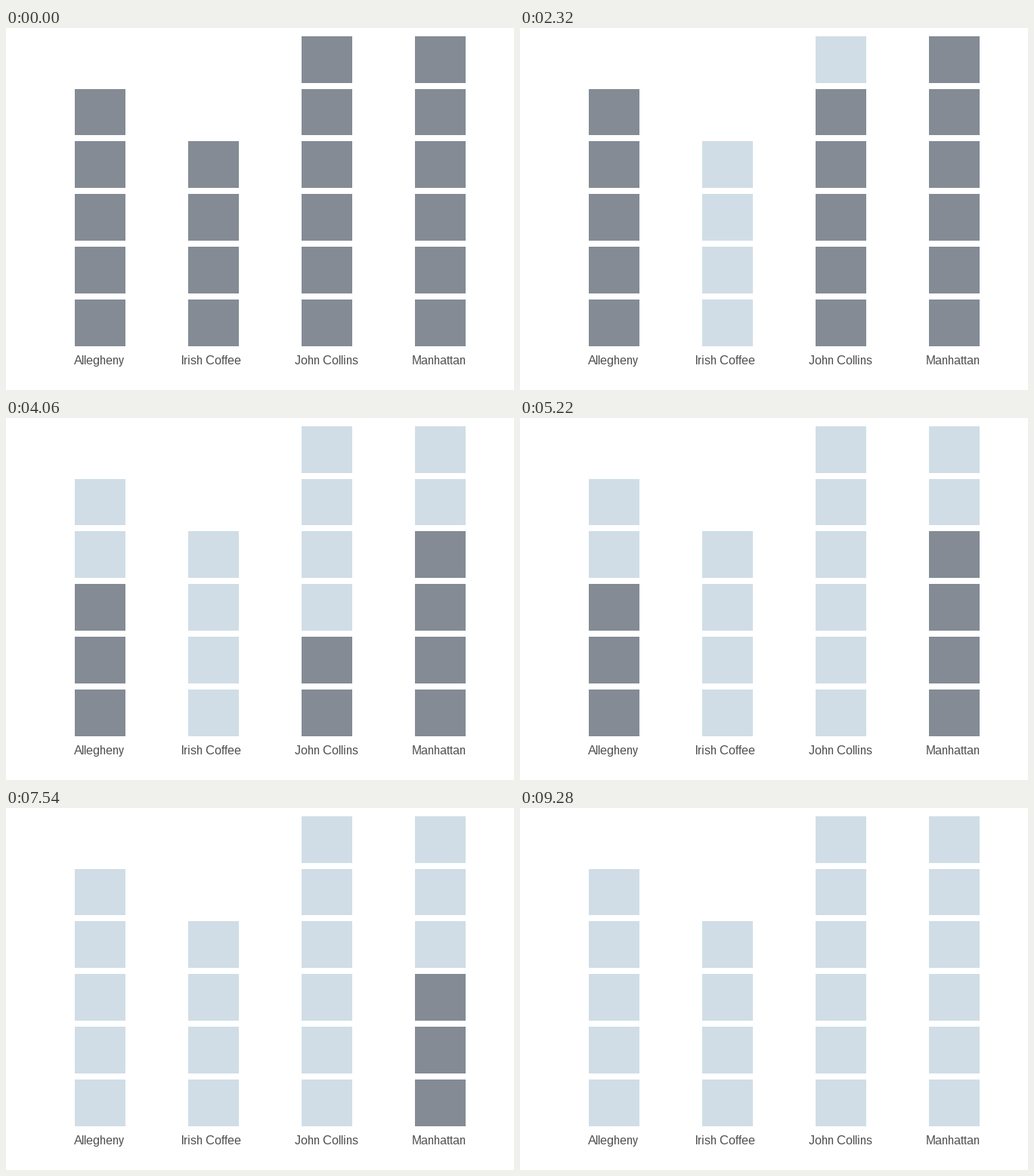
Write a matplotlib script that moves like this. It is 672 by 480 pixels and loops after 9.86 s.

```python
import matplotlib.pyplot as plt
from matplotlib.animation import FuncAnimation
from matplotlib.patches import Rectangle

# Full glyph hinting keeps the labels crisp on the pixel grid
plt.rcParams.update({
    "font.family": "Liberation Sans",
    "text.hinting": "native",
    "text.hinting_factor": 1,
})

WIDTH, HEIGHT, DPI = 672, 480, 96
STEPS, STEP_MS = 17, 580
FULL, EMPTY, INK = "#848b95", "#d0dde6", "#4d4d4d"
ROWS, PITCH = 6, 69.8
BASELINE = 446

# label, label x, column x, step at which each block fades (top to bottom)
COLUMNS = [
    ("Allegheny", 90, 91, (5, 6, 10, 11, 12)),
    ("Irish Coffee", 232, 241, (1, 2, 3, 4)),
    ("John Collins", 382, 391, (1, 5, 6, 7, 8, 9)),
    ("Manhattan", 537, 541, (5, 7, 13, 14, 15, 16)),
]

fig = plt.figure(figsize=(WIDTH / DPI, HEIGHT / DPI), dpi=DPI, facecolor="white")
ax = fig.add_axes([0, 0, 1, 1])
ax.set(xlim=(0, WIDTH), ylim=(HEIGHT, 0))
ax.axis("off")


def add_block(x, row):
    top = round(10.8 + PITCH * row)
    bottom = round(72.6 + PITCH * row)
    block = Rectangle((x, top), 67, bottom - top, facecolor=FULL,
                      linewidth=0, antialiased=False)
    return ax.add_patch(block)


blocks = []
for label, label_x, x, fades in COLUMNS:
    first_row = ROWS - len(fades)
    for row, fade in enumerate(fades, first_row):
        blocks.append((add_block(x, row), fade))
    ax.text(label_x, BASELINE, label, size=12, color=INK,
            ha="left", va="baseline")


def draw(step):
    for block, fade in blocks:
        block.set_facecolor(EMPTY if step >= fade else FULL)
    return [block for block, _ in blocks]


anim = FuncAnimation(fig, draw, frames=STEPS, interval=STEP_MS,
                     repeat=True, repeat_delay=0, blit=False)
plt.show()
```
